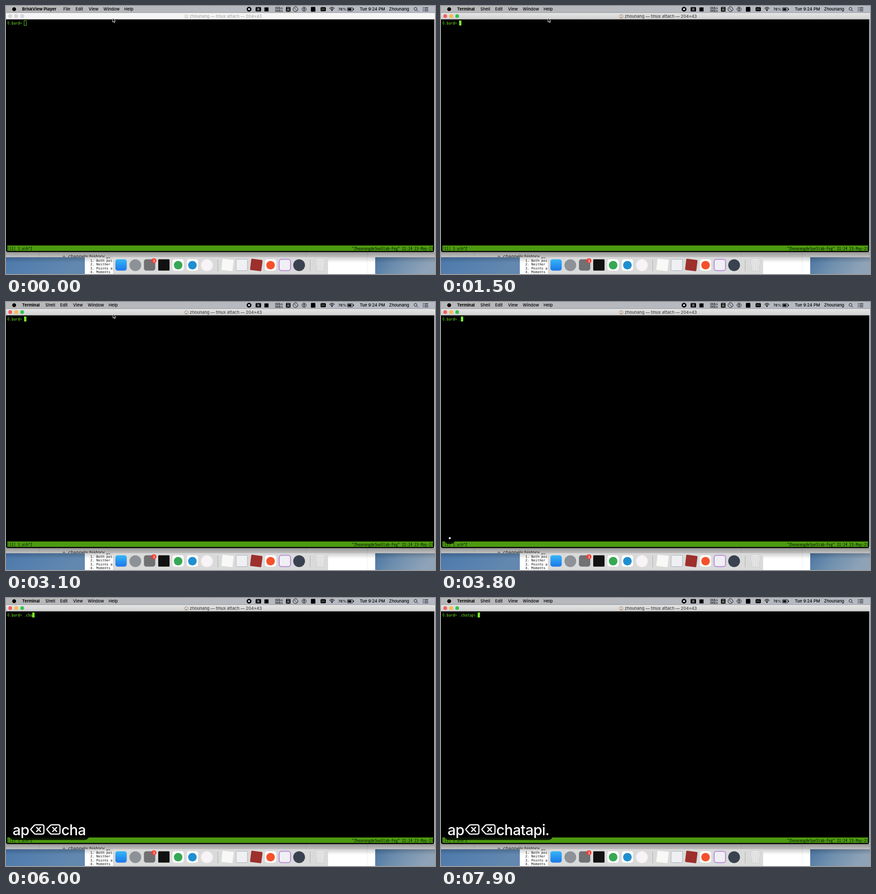
Recreate the animation shown at these times as an HTML page. Size 947 by 592 pixels, loop 8000 ms.

```html
<!DOCTYPE html>
<html lang="en">
<head>
<meta charset="utf-8">
<style>
html, body { margin: 0; width: 100%; height: 100%; overflow: hidden; background: #000; }
svg { display: block; width: 947px; height: 592px; }
text { white-space: pre; }
.ui { font: 500 9.2px Inter, "Liberation Sans", sans-serif; }
.bold { font-weight: 700; }
.cell { font-family: "Noto Sans Mono CJK SC", "Liberation Mono", monospace; }
.note { font: 7.4px "DejaVu Sans Mono", monospace; }
.keys { font: 500 32px Inter, "Liberation Sans", sans-serif; letter-spacing: -.7px; fill: #fff; }
</style>
</head>
<body>
<svg viewBox="0 0 947 592">
  <defs>
    <linearGradient id="deskLeft" x2="1" y2=".3">
      <stop stop-color="#4a78ab"/><stop offset="1" stop-color="#6388b0"/>
    </linearGradient>
    <linearGradient id="deskRight" x2="1" y2=".3">
      <stop stop-color="#44709f"/><stop offset=".5" stop-color="#6f8fae"/><stop offset="1" stop-color="#8fa3b8"/>
    </linearGradient>
    <linearGradient id="menuBar">
      <stop stop-color="#b7b7b9"/><stop offset="1" stop-color="#b5bac5"/>
    </linearGradient>
    <linearGradient id="bar" x2="0" y2="1">
      <stop stop-color="#e6e6e6"/><stop offset="1" stop-color="#d0d0d0"/>
    </linearGradient>
    <linearGradient id="shade" x2="0" y2="1">
      <stop stop-color="#000" stop-opacity=".38"/><stop offset="1" stop-color="#000" stop-opacity="0"/>
    </linearGradient>
    <linearGradient id="blue" x2="0" y2="1">
      <stop stop-color="#35b5f7"/><stop offset="1" stop-color="#1d78e8"/>
    </linearGradient>
    <clipPath id="page"><path d="M0 540H947V555H0Z"/></clipPath>
    <clipPath id="doc"><path d="M174 555H237V592H174Z"/></clipPath>
  </defs>

  <!-- desktop and rear windows -->
  <rect y="540" width="174" height="52" fill="url(#deskLeft)"/>
  <rect x="815" y="540" width="132" height="52" fill="url(#deskRight)"/>
  <rect y="15" width="947" height="540" fill="#efefef"/>
  <path d="M73.500 540V555M662.500 540V555M797.500 540V555" stroke="#d9d9d9"/>
  <g clip-path="url(#page)">
    <circle cx="128" cy="554" r="2" fill="none" stroke="#333"/>
    <text x="137" y="557" font-family="Inter, sans-serif" font-size="10.400" fill="#222">channels:history,</text>
  </g>
  <rect x="174" y="555" width="641" height="37" fill="#fff"/>
  <path d="M797.500 555V592" stroke="#eee"/>
  <g id="notes" class="note" clip-path="url(#doc)" fill="#111"></g>
  <rect y="543" width="947" height="24" fill="url(#shade)"/>

  <!-- terminal window -->
  <rect y="20" width="945.500" height="523.500" rx="4" fill="#000"/>
  <rect id="titleBar" y="15" width="946" height="14.500"/>
  <g id="lights"></g>
  <g id="home">
    <path d="M394 22.500L398 18.800L402 22.500H401V26.500H395V22.500Z" fill="#ece4d8" stroke="#8d8070" stroke-width=".7"/>
    <path d="M393.500 22.600L398 18.500L402.500 22.600" fill="none" stroke="#9a7256" stroke-width=".9"/>
    <path d="M397.200 23.800H398.800V26.500H397.200Z" fill="#8d6a45"/>
  </g>
  <text id="title" class="ui" x="405.500" y="26">zhounang — tmux attach — 204×43</text>
  <text id="prompt" class="cell" x="3" y="41" fill="#6bd81e"></text>
  <rect id="caret" y="32" width="5" height="11"/>
  <rect x="3" y="529" width="940" height="12" fill="#4d9a10"/>
  <text class="cell" x="3" y="538.500" fill="#0a1a00">[11] 1:aih*Z</text>
  <text class="cell" x="943" y="538.500" text-anchor="end" fill="#0a1a00">"ZhounangdeSunSlab-Fog" 21:24 23-May-23</text>

  <!-- menu bar -->
  <rect width="947" height="15" fill="url(#menuBar)"/>
  <path d="M0 14.700H947" stroke="#777" stroke-width=".6"/>
  <circle cx="18" cy="7" r="4.300"/>
  <g id="menu" class="ui"></g>
  <g class="ui">
    <circle cx="536.500" cy="7" r="5.300"/>
    <rect x="534.500" y="5" width="4" height="4" fill="#ddd"/>
    <rect x="551" y="2.500" width="12" height="9.500" rx="1"/>
    <text x="557" y="10" text-anchor="middle" fill="#ddd" style="font:7px 'DejaVu Sans',sans-serif">⌘</text>
    <rect x="570.500" y="3" width="9" height="9"/>
    <text x="594" y="6.700" style="font-size:5.800px">0KB/s</text>
    <text x="594" y="12.700" style="font-size:5.800px">0KB/s</text>
    <rect x="618" y="2" width="10" height="10.500" rx="1.500"/>
    <text x="623" y="10" text-anchor="middle" fill="#ddd" style="font:7.500px 'Noto Sans CJK SC',sans-serif">英</text>
    <g fill="none" stroke="#111">
      <circle cx="639" cy="7" r="5.300"/><path d="M636 4L639.500 7.500L642 10"/>
      <circle cx="658" cy="7" r="4.600"/><path d="M655.500 6H660.500M658 6V8M658 8L656.500 10.500M658 8L659.500 10.500"/>
      <path d="M714 5.500Q719.500 .500 725 5.500M716 7.600Q719.500 4.300 723 7.600" stroke-width="1.300"/>
      <rect x="753.500" y="3.500" width="12" height="7.500" rx="1.500"/>
      <circle cx="904" cy="6.300" r="3.200"/><path d="M906.500 8.800L909.500 11.800"/>
      <path d="M920 3.700H922M923.500 3.700H932M920 7.200H922M923.500 7.200H932M920 10.700H922M923.500 10.700H932" stroke-width="1.300"/>
    </g>
    <circle cx="658" cy="4.500" r="1"/>
    <rect x="673" y="2" width="10" height="10.500" rx="1.500"/>
    <rect x="694.500" y="2.500" width="11.500" height="9" rx="1.500"/>
    <path d="M697.500 5V9M700 5V9M702.500 5V9" stroke="#bbb" stroke-width=".8"/>
    <path d="M717.500 9Q719.500 7 721.500 9L719.500 11.500Z"/>
    <path d="M755 5H762.500V9.500H755ZM766.500 5.500H768V9H766.500Z"/>
    <text x="733.500" y="10.300" style="font-size:8.200px">78%</text>
    <text x="781" y="10.300">Tue 9:24 PM</text>
    <text x="845.500" y="10.300">Zhounang</text>
  </g>

  <!-- dock -->
  <path d="M236 592V559Q236 555 240 555H707Q711 555 711 559V592Z" fill="#dadada"/>
  <path d="M467.500 560V586M671.500 560V586" stroke="#adadad"/>
  <g id="dock"></g>
  <circle cx="326.500" cy="562.700" r="5.500" fill="#f0382f"/>
  <text x="326.500" y="565.600" class="ui" text-anchor="middle" fill="#fff" style="font-size:8px">3</text>
  <path d="M683 560.500H705L701.500 585.500H686.500Z" fill="#e4e4e4" stroke="#cdcdcd"/>
  <ellipse cx="694" cy="560.500" rx="11" ry="1.800" fill="#efefef" stroke="#c8c8c8" stroke-width=".8"/>
  <path d="M688 564L690 584M694 564V584M700 564L698 584" stroke="#d4d4d4" stroke-width=".8"/>

  <g id="overlay"></g>
  <path id="pointer" d="M0 0V9L2.100 7.200L3.600 10.500L5.200 9.800L3.800 6.700H6.500Z" fill="#000" stroke="#fff" stroke-width=".9"/>
</svg>
<script>
const LOOP = 8000, CLICK = 400, CELL = 4.608;
const ERASE = '⌫';
const FADE_DELAY = 2000, FADE_TIME = 200;
const typed = [
  [3700, '.'], [4400, 'a'], [4600, 'p'], [5000, ERASE], [5200, ERASE],
  [5500, 'c'], [5700, 'h'], [5900, 'a'], [6300, 't'], [6600, 'a'],
  [6900, 'p'], [7200, 'i'], [7600, '.']
];
const $ = id => document.getElementById(id);

function add(parent, tag, attrs, content = '') {
  const el = document.createElementNS('http://www.w3.org/2000/svg', tag);
  for (const key in attrs) el.setAttribute(key, attrs[key]);
  el.textContent = content;
  return parent.appendChild(el);
}
function set(id, attrs) {
  for (const key in attrs) $(id).setAttribute(key, attrs[key]);
}

// Terminal text keeps the column width of a 204-column window.
function fitCells() {
  const ctx = document.createElement('canvas').getContext('2d');
  ctx.font = '100px "Noto Sans Mono CJK SC", "Liberation Mono", monospace';
  const size = CELL / (ctx.measureText('0').width / 100);
  document.querySelectorAll('.cell').forEach(el => el.style.fontSize = size + 'px');
}

function buildDock() {
  const dock = $('dock');
  const tile = (x, fill, more = {}) =>
    add(dock, 'rect', { x: x - 12.5, y: 559.5, width: 25, height: 25, rx: 5, fill, ...more });
  const disc = (x, fill, r = 13) => add(dock, 'circle', { cx: x, cy: 572.5, r, fill });
  tile(254, 'url(#blue)');
  disc(285.5, '#8c9297');
  tile(317, '#6f7173');
  tile(348.5, '#111', { rx: 1.5 });
  [[380, '#36a853'], [411.5, '#1f8fd0'], [584, '#f4512c']].forEach(([x, color]) => {
    tile(x, '#fff');
    disc(x, color, 9.5);
  });
  disc(443.5, '#f7f3f7');
  tile(489, '#f8f8f6', { rx: 1, transform: 'rotate(7 489 572)' });
  tile(520.5, '#eef0f4', { rx: 1, stroke: '#a9adb5' });
  tile(552.5, '#9d302d', { rx: 2, transform: 'rotate(7 552 572)' });
  tile(615.5, '#f0eff3', { stroke: '#b58bdc', 'stroke-width': 2 });
  disc(647, '#39424f');
}

function drawMenu(active) {
  const menu = $('menu');
  menu.replaceChildren();
  const shift = active ? 0 : 34.5;
  const label = (x, text, cls = '') => add(menu, 'text', { x, y: 10.3, class: cls }, text);
  if (active) {
    label(35.5, 'Terminal', 'bold');
    label(87, 'Shell');
    label(119.5, 'Edit');
  } else {
    label(35.5, 'BriskView Player', 'bold');
    label(126.5, 'File');
    label(153.5, 'Edit');
  }
  [[148, 'View'], [180.5, 'Window'], [226.5, 'Help']].forEach(([x, s]) => label(x + shift, s));
}

function drawWindow(active) {
  drawMenu(active);
  set('titleBar', { fill: active ? 'url(#bar)' : '#f5f5f5' });
  set('title', { fill: active ? '#444' : '#aaa' });
  set('home', { opacity: active ? 1 : .45 });
  const colors = active ? ['#fc5b57', '#fdbc40', '#34c84a'] : Array(3).fill('#d9d9d9');
  $('lights').replaceChildren();
  colors.forEach((fill, i) =>
    add($('lights'), 'circle', { cx: 9.3 + 13.2 * i, cy: 22.2, r: 4, fill, stroke: '#0002', 'stroke-width': .5 }));
}

function drawKeys(keys, baseline, opacity) {
  const row = add($('overlay'), 'g', { opacity });
  const bezel = add(row, 'rect', { x: 7, y: baseline - 31, height: 42, rx: 10, fill: '#000', 'fill-opacity': .86 });
  let x = 14.5;
  for (const part of keys.match(/⌫|[^⌫]+/g)) {
    if (part === ERASE) {
      add(row, 'path', {
        d: 'M12 1.500H26Q30 1.500 30 5.500V18Q30 22 26 22H12Q10 22 8.500 20.500L2 13.500Q.500 11.700 2 10L8.500 3Q10 1.500 12 1.500ZM14 7.300L22.500 16.200M22.500 7.300L14 16.200',
        transform: `translate(${x + 2.6} ${baseline - 24})`, fill: 'none',
        stroke: '#fff', 'stroke-width': 2.6, 'stroke-linecap': 'round'
      });
      x += 35.5;
    } else {
      const text = add(row, 'text', { x, y: baseline, class: 'keys' }, part);
      x += text.getComputedTextLength();
    }
  }
  bezel.setAttribute('width', Math.max(23, x + 1));
}

function render(time) {
  const active = time >= CLICK;
  const keys = typed.filter(([at]) => at <= time).map(([, key]) => key);
  const line = keys.reduce((s, key) => key === ERASE ? s.slice(0, -1) : s + key, '');
  drawWindow(active);
  $('prompt').textContent = '0.bard> ' + line;
  set('caret', {
    x: Math.round(3 + CELL * (8 + line.length)),
    fill: active ? '#78f52a' : 'none',
    stroke: active ? 'none' : '#67d41f'
  });
  // The pointer hides while typing.
  set('pointer', {
    transform: `translate(${active ? 236 : 235.3} 26.5)`,
    visibility: keys.length ? 'hidden' : 'visible'
  });

  $('overlay').replaceChildren();
  if (!keys.length) return;
  const fade = (time - typed[0][0] - FADE_DELAY) / FADE_TIME;
  const opacity = Math.min(1, Math.max(0, 1 - fade));
  if (opacity) drawKeys('.', keys.length > 1 ? 468.5 : 523.5, opacity);
  if (keys.length > 1) drawKeys(keys.slice(1).join(''), 523.5, 1);
}

['        po', '1. Both poi', '2. Neither ', '3. Points a', '4. Moments '].forEach((s, i) =>
  add($('notes'), 'text', { x: 186, y: 556.5 + 8.4 * i }, s));
fitCells();
buildDock();

const start = performance.now();
function tick() {
  render((performance.now() - start) % LOOP);
  requestAnimationFrame(tick);
}
tick();
</script>
</body>
</html>
```
